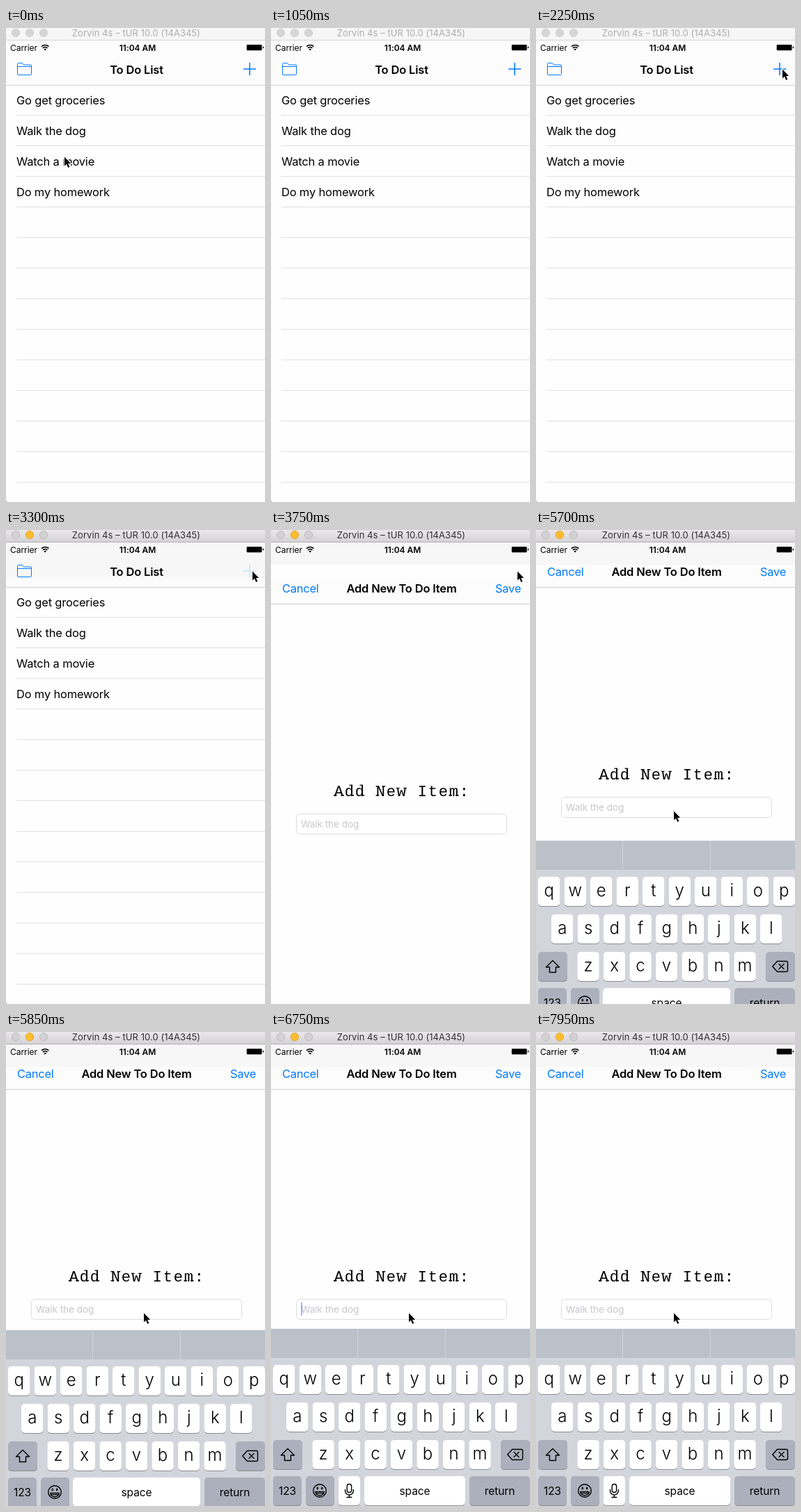
An HTML page for the animation above (8000 ms loop, 372 px wide and 682 px high).

```html
<!DOCTYPE html>
<html lang="en">
<head>
<meta charset="utf-8">
<title>To Do List</title>
<style>
  html, body { margin: 0; width: 100%; height: 100%; overflow: hidden; background: #fff; }
  svg { display: block; width: 372px; height: 682px; }
  text { font: 400 16.5px Inter, Roboto, sans-serif; letter-spacing: -.19px; }
  .mid { text-anchor: middle; }
  .end { text-anchor: end; }
  .bold { font-weight: 600; }
  .blue { fill: #007aff; letter-spacing: -.27px; }
  .window { font-size: 13px; letter-spacing: .06px; }
  .status { font-size: 12px; letter-spacing: -.05px; }
  .label { font: 400 22px "Liberation Mono", monospace; letter-spacing: 1.8px; }
  .hint { font-size: 13.6px; letter-spacing: -.05px; fill: #c7c7cd; }
  .letter { font-size: 24px; font-weight: 300; letter-spacing: 0; }
  .word { font-size: 15.5px; letter-spacing: -.1px; }
  .line { fill: none; stroke: #000; stroke-width: 1.4; stroke-linejoin: round; stroke-linecap: round; }
</style>
</head>
<body>
<svg id="stage" viewBox="0 0 372 682">
  <defs>
    <linearGradient id="chrome" x2="0" y2="1">
      <stop stop-color="#eae8ea"/><stop offset="1" stop-color="#d3d1d3"/>
    </linearGradient>
  </defs>
  <rect width="372" height="682" fill="#fefefe"/>
  <g id="list"></g>
  <path d="M0 680l2 2H0z" fill="#aaa"/>
  <g id="sheet"></g>
  <g id="status"></g>
  <g id="bar"></g>
  <g id="keys"></g>
  <path id="cursor" d="M0 0V13L3 10.3 5.2 15.4 7.3 14.5 5.1 9.5H9.2Z"
        stroke="#fff" stroke-width="1.8" paint-order="stroke"/>
</svg>
<script>
const LOOP = 8000, STEP = 150;
const $ = id => document.getElementById(id);
const rect = (x, y, w, h, fill, r = 0, more = '') =>
  `<rect x="${x}" y="${y}" width="${w}" height="${h}" rx="${r}" fill="${fill}" ${more}/>`;
const text = (x, y, s, cls = '') => `<text x="${x}" y="${y}" class="${cls}">${s}</text>`;
const path = (d, cls = 'line', more = '') => `<path d="${d}" class="${cls}" ${more}/>`;

function drawList() {
  const items = ['Go get groceries', 'Walk the dog', 'Watch a movie', 'Do my homework'];
  let s = rect(0, 18, 372, 64, '#fcfcfc')
    + rect(0, 18, 372, 50, '#f7f7f7', 0, 'id="tint"')
    + rect(0, 82, 372, 1, '#cfcfd1')
    + path('M16.5 66.5V51.5q0-1 1-1h6l2 2.5h10q1 0 1 1V66.5q0 1-1 1h-18q-1 0-1-1zM16.5 55.5h20',
        'line', 'style="stroke:#007aff;stroke-width:1"')
    + path('M341 59h18M350 50v18', 'line', 'id="plus" style="stroke-width:1.6;stroke-linecap:butt"')
    + text(187.5, 66, 'To Do List', 'mid bold');
  for (let i = 0; i < 13; i++) s += rect(15, 125 + 44 * i, 357, 1, '#e0e0e2');
  items.forEach((item, i) => s += text(15, 110 + 44 * i, item));
  $('list').innerHTML = s;
}

// Slab feet for the typewriter label: [cell, x in cell, height above baseline]
function slabs(x0, base) {
  const feet = [
    [0, 1.4, 0], [0, 11.8, 0], [1, 11, 0], [1, 9, 14.6], [2, 11, 0], [2, 9, 14.6],
    [4, 2.1, 13], [4, 11.1, 13], [4, 2.1, 0], [6, 1.4, 10.3], [6, 11.8, 10.3],
    [11, 1.9, 0], [11, 11.5, 0]
  ];
  return path(feet.map(([c, x, y]) => `M${x0 + 15 * c + x - 2.3} ${base - y - .8}h4.6`).join(''),
    'line', 'style="stroke-linecap:butt"');
}

function drawSheet() {
  $('sheet').innerHTML =
    rect(0, 18, 372, 664, '#fefefe', 0, 'id="page"')
    + '<g id="form">'
    + rect(0, 50, 372, 32, '#fcfcfc')
    + rect(0, 82, 372, 1, '#cfcfd1')
    + text(16, 66, 'Cancel', 'blue')
    + text(187.5, 66, 'Add New To Do Item', 'mid bold')
    + text(359, 66, 'Save', 'end blue')
    + text(90.8, 358.5, 'Add New Item:', 'label') + slabs(90.8, 358.5)
    + rect(36.5, 384.5, 302, 29, '#fff', 5, 'stroke="#dcdcdc"')
    + text(43, 403.5, 'Walk the dog', 'hint')
    + rect(43, 389, 2, 19, '#426bf2', 0, 'id="caret"')
    + '</g>';
}

function drawStatus() {
  $('status').innerHTML =
    text(6, 32.5, 'Carrier', 'status')
    + path('M51 26.6a7.6 7.6 0 0 1 10.4 0M53 28.9a4.7 4.7 0 0 1 6.4 0', 'line',
        'style="stroke-width:1.6;stroke-linecap:butt"')
    + path('M54.4 30.4a2.8 2.8 0 0 1 3.6 0L56.2 32.6z', '')
    + text(189, 32.5, '11:04 AM', 'status mid bold')
    + rect(345.7, 23.9, 21.8, 8.4, '#000', 1.2)
    + path('M368.8 26.6q1.6.3 1.6 1.5t-1.6 1.5z', '');
}

function drawBar(active) {
  const dot = (x, lit) => `<circle cx="${x}" cy="7" r="5.6" fill="${
    lit ? '#fdbd2e' : active ? '#d3d1d3' : '#d6d6d6'}" stroke="${
    lit ? '#dfa023' : active ? '#b9b7b9' : '#cccccc'}" stroke-width=".9"/>`;
  $('bar').innerHTML =
    rect(0, 0, 372, 18, active ? 'url(#chrome)' : '#f6f6f6')
    + rect(0, 17, 372, 1, active ? '#b3b1b3' : '#d4d4d4')
    + dot(14) + dot(34, active) + dot(54)
    + `<g fill="${active ? '#303030' : '#acacac'}">`
    + text(187, 12, 'Zorvin 4s – tUR 10.0 (14A345)', 'window mid') + '</g>';
}

function drawKeys() {
  const key = (x, y, w, label = '', cls = 'letter', fill = '#fff') =>
    rect(x, y + 1, w, 42, '#898c91', 5) + rect(x, y, w, 42, fill, 5)
    + text(x + w / 2, y + (cls === 'letter' ? 28 : 26.5), label, cls + ' mid');
  const dark = (x, y, w, label) => key(x, y, w, label, 'word', '#abb0bc');
  const row = (letters, x, y) =>
    [...letters].map((c, i) => key(x + 37.5 * i, y, 31.5, c)).join('');

  $('keys').innerHTML =
    rect(0, 427, 372, 260, '#d2d5db') + rect(0, 427, 372, 42, '#bac1c9')
    + rect(124, 427, 1, 42, '#d0d5da') + rect(250, 427, 1, 42, '#d0d5da')
    + row('qwertyuiop', 3, 479) + row('asdfghjkl', 22, 533) + row('zxcvbnm', 59.3, 587)
    + dark(3, 587, 42) + dark(330, 587, 42)
    + dark(3, 639, 41, '123') + dark(50, 639, 41) + dark(285, 639, 87, 'return')
    + path('M24 599.5L33.5 609H28.5V616.5H19.5V609H14.5z')
    + path('M346.5 600.5H359.5q2 0 2 2V613.5q0 2-2 2H346.5L339.8 608zM349 604.5l7 7m0-7l-7 7')
    + '<circle cx="70" cy="660" r="9.3" class="line"/>'
    + path('M63.8 661.5h12.4a6.2 5.2 0 0 1-12.4 0zM64.5 663.6h11')
    + '<ellipse cx="66.8" cy="656.4" rx="1.2" ry="1.9"/><ellipse cx="73.2" cy="656.4" rx="1.2" ry="1.9"/>'
    + '<g id="wide">' + key(96, 639, 183, 'space', 'word') + '</g>'
    + '<g id="dictation">' + key(96.5, 639, 31.5) + key(134, 639, 145, 'space', 'word')
    + rect(109.2, 650.5, 6.4, 12, 'none', 3.2, 'class="line"')
    + path('M106.5 658.5v1.5a5.9 5.9 0 0 0 11.8 0v-1.5M112.4 666v3.5M109 669.5h6.8') + '</g>';
}

// [time, x, y]; no position means hidden
const pointer = [
  [0, 84, 185.5], [150, 72, 181], [300, 56, 168], [450, 48, 148], [600, 52, 124],
  [750, 61, 103], [900, 72, 86], [1050], [1350, 362, 56], [1500, 338, 54],
  [1800, 353, 58.5], [2250, 354, 59.5], [4200, 335, 125], [4350, 262, 310],
  [4500, 208, 426], [4650, 201, 412], [4800, 198, 406], [5100, 198, 404.5]
];
const caretFade = [
  [0, 0], [6300, 1], [6750, .5], [6900, 0], [7200, .5], [7350, 1], [7800, .5], [7950, 0]
];
const at = (steps, t) => steps.findLast(s => s[0] <= t);
const show = (id, on) => $(id).style.display = on ? '' : 'none';
const shift = (id, y) => $(id).setAttribute('transform', `translate(0 ${y})`);

// Critically damped slide from `dist` to rest
function settle(ms, dist) {
  const k = 18.26 * Math.max(0, ms) / 1000;
  return Math.round(dist * (1 + k) * Math.exp(-k));
}

let wasActive = null;
function render(time) {
  const t = Math.floor(time % LOOP / STEP) * STEP;
  const active = t >= 3300;
  if (active !== wasActive) drawBar(wasActive = active);
  show('tint', active);
  $('plus').style.stroke = active ? '#c9e1fb' : '#007aff';

  const slide = settle(t - 3469, 667);
  show('sheet', t >= 3600);
  shift('form', slide);
  $('page').setAttribute('y', Math.max(50, 18 + slide));
  $('caret').style.opacity = at(caretFade, t)[1];

  show('keys', t >= 5700);
  shift('keys', settle(t - 5470, 258));
  show('wide', t < 6300);
  show('dictation', t >= 6300);

  const [, x, y] = at(pointer, t);
  show('cursor', x !== undefined);
  if (x !== undefined) $('cursor').setAttribute('transform', `translate(${x} ${y})`);
}

drawList();
drawSheet();
drawStatus();
drawKeys();
const start = performance.now();
function tick() {
  render(performance.now() - start);
  requestAnimationFrame(tick);
}
tick();
</script>
</body>
</html>
```
